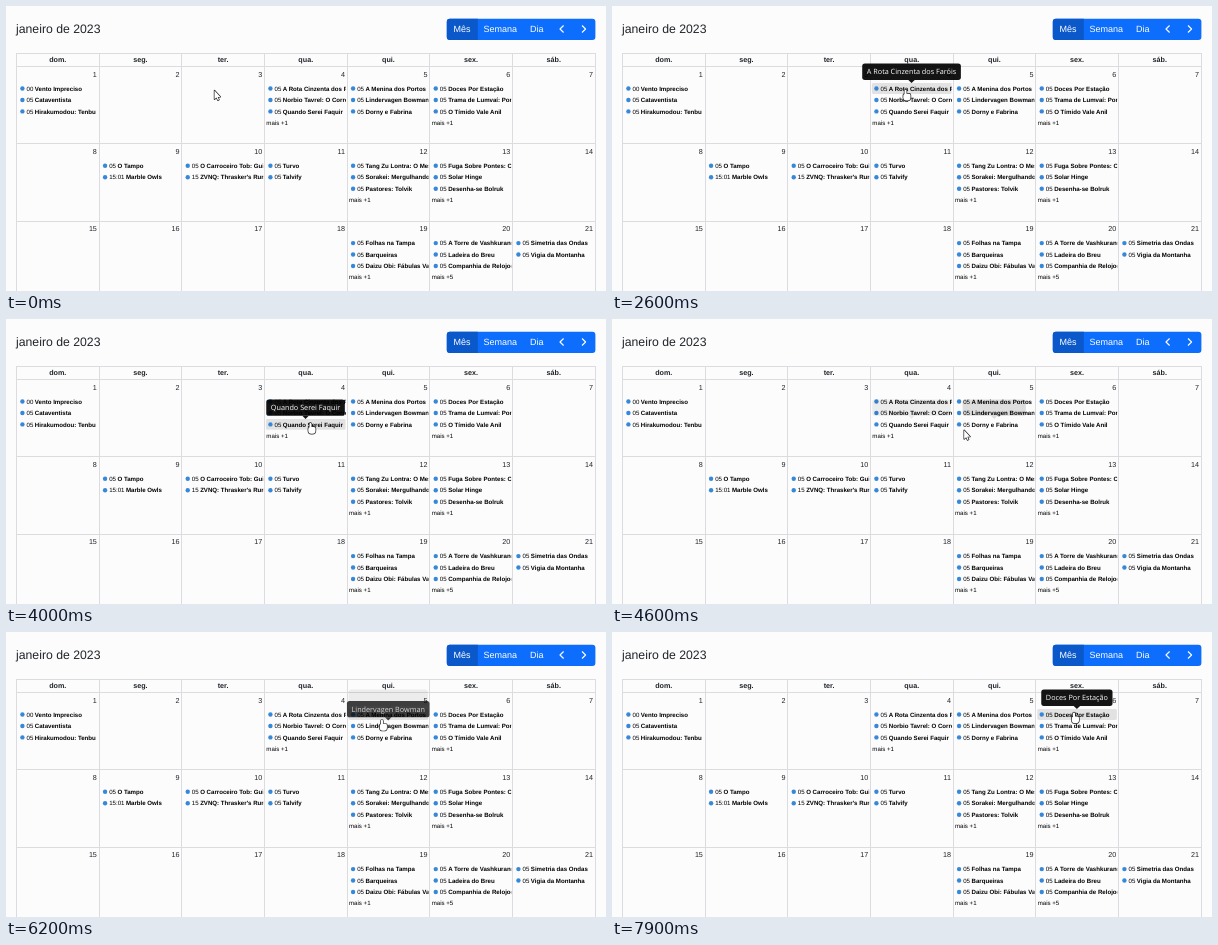
Recreate the animation shown at these times as an HTML page with a canvas. Size 600x285 px, loop 8 s.

```html
<!DOCTYPE html>
<html lang="pt">
<head>
<meta charset="utf-8">
<title>Calendário</title>
<style>
html, body { margin: 0; width: 100%; height: 100%; overflow: hidden; background: #fcfcfd; }
canvas { display: block; width: 600px; height: 285px; }
</style>
</head>
<body>
<canvas id="stage" width="600" height="285"></canvas>
<script>
const LOOP = 8000, STEP = 100, FADE = 150;
const SANS = '"Liberation Sans", Arial, sans-serif';
const TITLE = '12.25px ' + SANS, BUTTON = '9px ' + SANS, BASE = '7.2px ' + SANS, SMALL = '6.12px ' + SANS;
const TIP = '500 7.25px "Open Sans", "Noto Sans", sans-serif';
const INK = '#212529';
const LEFT = 10.4, COL = 82.67, TOP = 60.5, WEEK = 77.3, LINE = 11.45;
const TIP_MAX = 109, TIP_PAD = 4.6, TIP_LINE = 11.4;
const DAYS = ['dom.', 'seg.', 'ter.', 'qua.', 'qui.', 'sex.', 'sáb.'];

// Day of month -> rows, each "time title" or a "mais" link
const EVENTS = {
  1: ['00 Vento Impreciso', '05 Cataventista', '05 Hirakumodou: Tenbu'],
  4: ['05 A Rota Cinzenta dos Faróis', '05 Norbio Tavrel: O Corretor de Vila Cromo', '05 Quando Serei Faquir', 'mais +1'],
  5: ['05 A Menina dos Portos', '05 Lindervagen Bowman', '05 Dorny e Fabrina'],
  6: ['05 Doces Por Estação', '05 Trama de Lumvaí: Portões', '05 O Tímido Vale Anil', 'mais +1'],
  9: ['05 O Tampo', '15:01 Marble Owls'],
  10: ['05 O Carroceiro Tob: Guia', "15 ZVNQ: Thrasker's Rune"],
  11: ['05 Turvo', '05 Talvify'],
  12: ['05 Tang Zu Lontra: O Mestre', '05 Sorakei: Mergulhando', '05 Pastores: Tolvik', 'mais +1'],
  13: ['05 Fuga Sobre Pontes: Caminho', '05 Solar Hinge', '05 Desenha-se Bolruk', 'mais +1'],
  19: ['05 Folhas na Tampa', '05 Barqueiras', '05 Daizu Obi: Fábulas Vagas', 'mais +1'],
  20: ['05 A Torre de Vashkurand', '05 Ladeira do Breu', '05 Companhia de Relojoeiros', 'mais +5'],
  21: ['05 Simetria das Ondas', '05 Vigia da Montanha']
};

// Eased pointer moves: start, end, x, y, sideways bow
const HOME = [208.5, 84.5];
const MOVES = [
  [400, 1700, 284.5, 76, -8],
  [1700, 2100, 293, 83, 0],
  [2500, 3100, 299.8, 93.5, 0],
  [3300, 4000, 304.5, 104, 2],
  [4000, 4800, 361, 111.5, 2],
  [4800, 5400, 370.5, 101.5, 0],
  [5400, 6800, 379.5, 79, 0],
  [7100, 7900, 462, 80.5, 5]
];

const ctx = document.getElementById('stage').getContext('2d');
ctx.textRendering = 'geometricPrecision';

const rows = Object.entries(EVENTS).flatMap(([day, list]) => list.map((label, i) => {
  const { x, y } = cell(day);
  const [time, ...words] = label.split(' ');
  return { x, y: y + 22 + LINE * i, label, time, title: words.join(' ') };
}));
const links = rows.filter(r => r.time === 'mais');
const events = rows.filter(r => r.time !== 'mais');

function cell(day) {
  const n = day - 1;
  return { x: LEFT + n % 7 * COL, y: TOP + Math.floor(n / 7) * WEEK };
}

function text(str, x, y, font, color = INK, align = 'left') {
  ctx.font = font;
  ctx.fillStyle = color;
  ctx.textAlign = align;
  ctx.fillText(str, x, y);
}

function width(str, font) {
  ctx.font = font;
  return ctx.measureText(str).width;
}

function box(x, y, w, h, r, color) {
  ctx.fillStyle = color;
  ctx.beginPath();
  ctx.roundRect(x, y, w, h, r);
  ctx.fill();
}

function trace(pts, x, y) {
  ctx.beginPath();
  for (let i = 0; i < pts.length; i += 2) ctx.lineTo(x + pts[i], y + pts[i + 1]);
}

function drawToolbar() {
  text('janeiro de 2023', 10, 27.3, TITLE);
  box(440.8, 12.7, 148.6, 21.3, 3, '#0d6efd');
  box(440.8, 12.7, 31, 21.3, [3, 0, 0, 3], '#0a58ca');
  let x = 441;
  for (const label of ['Mês', 'Semana', 'Dia']) {
    const w = width(label, BUTTON) + 13;
    text(label, x + w / 2, 26.3, BUTTON, '#fff', 'center');
    x += w;
  }
  ctx.strokeStyle = '#fff';
  ctx.lineWidth = 1.1;
  for (const dir of [-1, 1]) {
    trace([-1.8 * dir, -3.5, 1.8 * dir, 0, -1.8 * dir, 3.5], 566.8 + 11 * dir, 23);
    ctx.stroke();
  }
}

function drawGrid() {
  ctx.fillStyle = '#dcdce0';
  ctx.fillRect(10, 47, 580, 1);
  for (let c = 0; c <= 7; c++) ctx.fillRect(Math.floor(LEFT + c * COL), 47, 1, 238);
  for (let w = 0; w < 3; w++) ctx.fillRect(10, Math.floor(TOP + w * WEEK), 580, 1);
  DAYS.forEach((d, c) => text(d, LEFT + (c + .5) * COL, 56.4, 'bold ' + BASE, INK, 'center'));
  for (let day = 1; day <= 21; day++) {
    const { x, y } = cell(day);
    text(day, x + COL - 2.2, y + 10.2, BASE, INK, 'right');
  }
  for (const r of links) text(r.label, r.x + 1.9, r.y + 1.8, SMALL, '#000');
}

function drawEvent(e, hot) {
  if (hot) box(e.x + 1.5, e.y - 5.4, COL - 3, 10.8, 1.4, 'rgba(0,0,0,.1)');
  ctx.fillStyle = '#3788d8';
  ctx.beginPath();
  ctx.arc(e.x + 6, e.y, 2.2, 0, 7);
  ctx.fill();
  ctx.save();
  ctx.beginPath();
  ctx.rect(e.x, e.y - 6, COL - 1.2, 12);
  ctx.clip();
  text(e.time, e.x + 10.1, e.y + 2.1, SMALL, '#000');
  text(e.title, e.x + 11.6 + width(e.time, SMALL), e.y + 2.1, 'bold ' + SMALL, '#000');
  ctx.restore();
}

function wrap(str, max) {
  const lines = [];
  for (const word of str.split(' ')) {
    const last = lines.length - 1, joined = lines[last] + ' ' + word;
    if (last >= 0 && width(joined, TIP) <= max) lines[last] = joined;
    else lines.push(word);
  }
  return lines;
}

function drawTip(e, alpha) {
  const lines = wrap(e.title, TIP_MAX - 2 * TIP_PAD);
  const w = lines.length > 1 ? TIP_MAX : width(e.title, TIP) + 2 * TIP_PAD;
  const h = 5 + TIP_LINE * lines.length;
  const mid = e.x + COL / 2 - .2, tip = e.y - 5.4, y = tip - 3.2 - h;
  ctx.globalAlpha = alpha * .92;
  box(mid - w / 2, y, w, h, 2.6, '#000');
  trace([-3.2, -3.2, 3.2, -3.2, 0, 0], mid, tip);
  ctx.fill();
  ctx.globalAlpha = alpha;
  lines.forEach((s, i) => text(s, mid, y + 10.6 + TIP_LINE * i, TIP, '#fff', 'center'));
  ctx.globalAlpha = 1;
}

function arrow(x, y) {
  trace([0, 0, 0, 8.7, 2, 6.9, 3.3, 9.8, 4.5, 9.2, 3.2, 6.5, 5.9, 6.4], x, y);
  ctx.closePath();
}

function hand(x, y) {
  ctx.beginPath();
  ctx.roundRect(x - 1, y, 2, 8, 1);
  ctx.roundRect(x - 2.2, y + 4, 7.2, 6.8, [2, 1.5, 3, 3]);
}

function drawPointer([x, y], shape) {
  shape(x, y);
  ctx.lineJoin = 'round';
  ctx.lineWidth = 1.4;
  ctx.strokeStyle = '#222';
  ctx.stroke();
  ctx.fillStyle = '#fff';
  ctx.fill();
}

function pointerAt(t) {
  let [x, y] = HOME;
  for (const [start, end, toX, toY, bow] of MOVES) {
    if (t <= start) break;
    const k = Math.min(1, (t - start) / (end - start)), e = k * k * (3 - 2 * k);
    x += (toX - x) * e;
    y += (toY - y) * e + bow * Math.sin(Math.PI * e);
  }
  return [x, y];
}

function eventAt([x, y]) {
  return events.find(e => x > e.x + 1.5 && x < e.x + COL - 1.5 && Math.abs(y - e.y) < 5.5);
}

// Linear fades: opacity is the share of the last FADE ms spent on an event
function tipsAt(t) {
  const tips = new Map();
  for (let d = 0; d < FADE; d += 10) {
    const e = eventAt(pointerAt(t - d));
    if (e) tips.set(e, (tips.get(e) || 0) + 10 / FADE);
  }
  return tips;
}

function draw(t) {
  const pos = pointerAt(t), hot = eventAt(pos);
  ctx.fillStyle = '#fcfcfd';
  ctx.fillRect(0, 0, 600, 285);
  drawToolbar();
  drawGrid();
  for (const e of events) drawEvent(e, e === hot);
  tipsAt(t).forEach((alpha, e) => drawTip(e, Math.min(1, alpha)));
  drawPointer(pos, hot ? hand : arrow);
}

const start = performance.now();
function tick() {
  const t = (performance.now() - start) % LOOP;
  draw(Math.floor(t / STEP) * STEP);
  requestAnimationFrame(tick);
}
tick();
</script>
</body>
</html>
```
